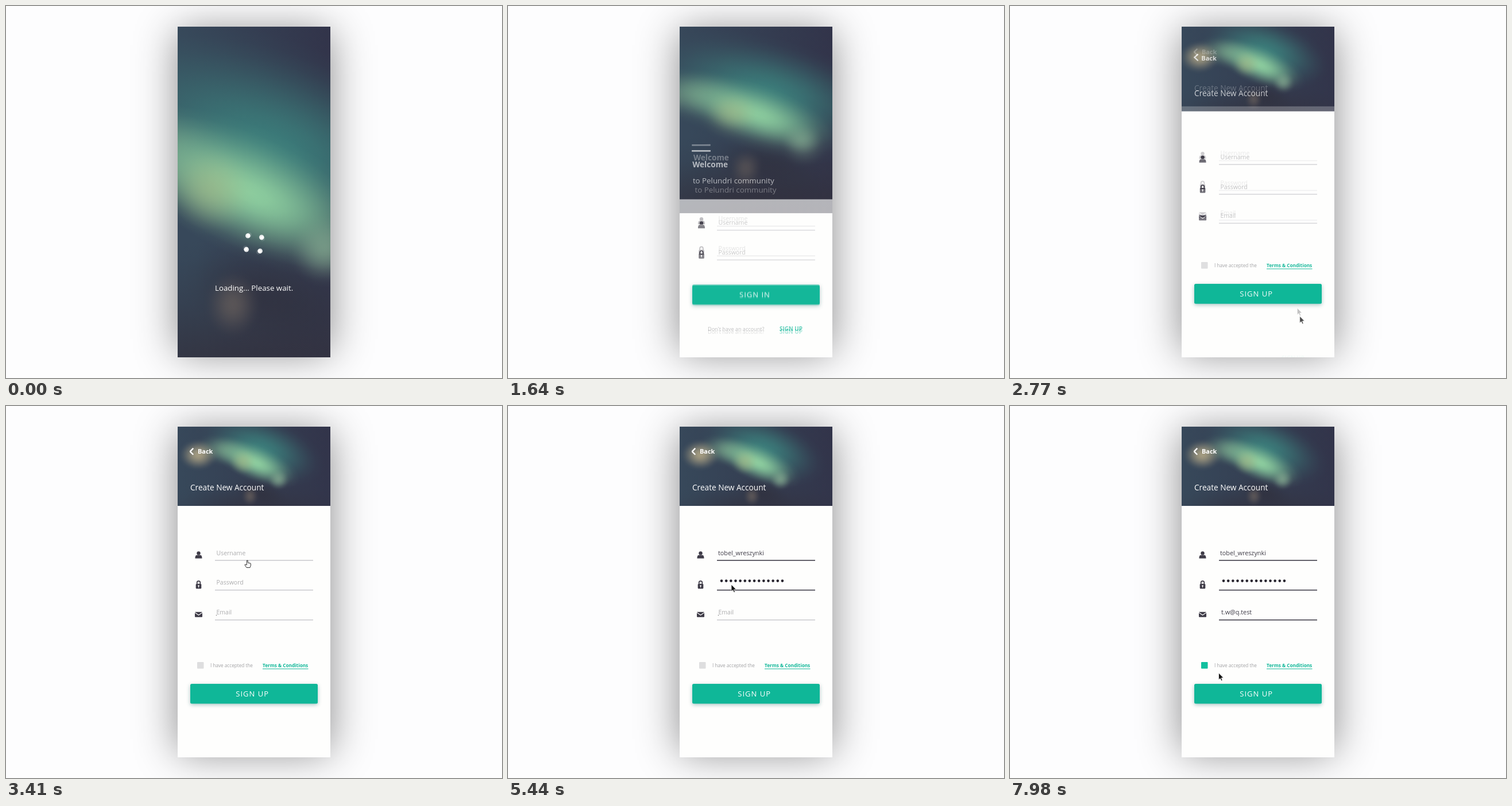
An HTML page with a canvas that plays this animation: 864 px wide and 648 px high, repeating every 8 s.

```html
<!DOCTYPE html>
<html lang="en">
<head>
<meta charset="utf-8">
<title>Sign-up flow</title>
<style>
  html, body { margin: 0; width: 100%; height: 100%; overflow: hidden; background: #fdfdfe; }
  canvas { display: block; }
</style>
</head>
<body>
<canvas id="stage" width="864" height="648"></canvas>
<script>
const W = 864, H = 648, LOOP = 8000;
const STEP = 39.5, PHASE = 1497.2; // neighbouring steps are cross-blended
const PHONE = { x: 299, y: 36, w: 266, h: 576 };
const TEAL = '#0fb798', INK = '#3f3c48', PAPER = '#fefefd', PALE = '#acacae';
const USERNAME = 'tobel_wreszynki', EMAIL = 't.w@q.test', PASSWORD_LENGTH = 14;

const lerp = (a, b, p) => a + (b - a) * p;
const clamp = v => Math.max(0, Math.min(1, v));
const span = (t, start, end) => clamp((t - start) / (end - start));
const easeOut = p => 1 - (1 - p) ** 2.6;
const easeInOut = p => p < .5 ? 2 * p * p : 1 - 2 * (1 - p) ** 2;

function makeLayer() {
  const canvas = document.createElement('canvas');
  canvas.width = W;
  canvas.height = H;
  return canvas;
}

const backdrop = makeLayer();
{
  const b = backdrop.getContext('2d');
  b.fillStyle = '#fdfdfe';
  b.fillRect(0, 0, W, H);
  b.shadowColor = 'rgba(0,0,0,.46)';
  b.shadowBlur = 68;
  b.fillRect(PHONE.x, PHONE.y + 8, PHONE.w, PHONE.h - 16);
}

const layer = makeLayer();
const g = layer.getContext('2d');

function text(str, x, y, size, color, { weight = 400, alpha = 1, spacing = 0 } = {}) {
  if (alpha <= 0) return;
  g.save();
  g.globalAlpha *= alpha;
  g.font = `${weight} ${size}px "Open Sans", "Noto Sans", sans-serif`;
  g.letterSpacing = spacing + 'px';
  g.fillStyle = color;
  g.fillText(str, x, y);
  g.restore();
}

function dot(x, y, r, color) {
  g.fillStyle = color;
  g.beginPath();
  g.arc(x, y, r, 0, 7);
  g.fill();
}

function box(x, y, w, h, r, color) {
  g.fillStyle = color;
  g.beginPath();
  g.roundRect(x, y, w, h, r);
  g.fill();
}

function glow(x, y, rx, ry, turn, rgb, alpha) {
  g.save();
  g.translate(x, y);
  g.rotate(turn);
  g.scale(rx, ry);
  const fill = g.createRadialGradient(0, 0, 0, 0, 0, 1);
  for (let i = 0; i <= 8; i++) {
    const d = i / 8, fade = 1 - d * d * (3 - 2 * d);
    fill.addColorStop(d, `rgba(${rgb},${alpha * fade})`);
  }
  g.fillStyle = fill;
  g.fillRect(-1, -1, 2, 2);
  g.restore();
}

// Soft northern sky, laid out in the coordinates of the full-height screen.
function drawSky(at) {
  const sky = g.createLinearGradient(299, 60, 565, 36);
  sky.addColorStop(0, '#37485a');
  sky.addColorStop(1, '#32344a');
  g.fillStyle = sky;
  g.fillRect(PHONE.x, PHONE.y, PHONE.w, PHONE.h);
  g.save();
  g.translate(at(395, 415, 425), at(520, 275, 157));
  g.scale(at(1, .6, .31), at(1, .47, .3));
  g.translate(-395, -520);
  glow(430, 690, 620, 290, 0, '50,48,61', 1);
  glow(460, 245, 370, 190, .35, '60,130,126', .9);
  glow(250, 255, 170, 95, .2, '128,172,142', .6);
  glow(425, 325, 270, 112, .44, '140,204,158', 1);
  glow(355, 320, 85, 80, .5, '165,185,135', .55);
  glow(455, 505, 170, 95, .3, '48,49,63', .75);
  glow(555, 425, 65, 65, 0, '142,182,152', .6);
  glow(395, 520, 52, 62, 0, '112,102,96', .62);
  glow(105, 280, 115, 95, 0, '190,176,138', .8);
  g.restore();
}

function drawLoader(t) {
  const turn = -398.7 * (1 - span(t, 0, 1450)) * Math.PI / 180;
  for (let i = 0; i < 4; i++) {
    const a = turn + i * Math.PI / 2;
    dot(432 + 17 * Math.cos(a), 413.5 + 17 * Math.sin(a), 4.3, '#fff');
  }
}

// Two bars that lie flat as a rule and open into a back chevron.
function drawBackMark(at) {
  const open = at(.25, 0, 1), y = at(138, 253.5, 79.2);
  const x = at(336.5, 336.5, 323.4), half = at(14, 16.3, 4);
  g.strokeStyle = '#fff';
  g.lineWidth = 2.3;
  for (const side of [-1, 1]) {
    const a = side * open * Math.PI / 4;
    const dx = half * Math.cos(a), dy = half * Math.sin(a);
    const cy = y + side * 2.7 * open;
    g.beginPath();
    g.moveTo(x - dx, cy - dy);
    g.lineTo(x + dx, cy + dy);
    g.stroke();
  }
}

const icons = {
  user(x, y) {
    dot(x, y - 3, 3.2, INK);
    g.beginPath();
    g.moveTo(x - 6, y + 6);
    g.bezierCurveTo(x - 6, y - 1, x - 3, y, x, y + .5);
    g.bezierCurveTo(x + 3, y, x + 6, y - 1, x + 6, y + 6);
    g.fill();
  },
  lock(x, y) {
    box(x - 4.8, y - 1.5, 9.6, 8.5, 1.5, INK);
    g.strokeStyle = INK;
    g.lineWidth = 1.7;
    g.beginPath();
    g.moveTo(x - 2.8, y - 1);
    g.arc(x, y - 3.7, 2.8, Math.PI, 0);
    g.lineTo(x + 2.8, y - 1);
    g.stroke();
    dot(x, y + 2, 1.2, PAPER);
    g.fillRect(x - .5, y + 2, 1, 3);
  },
  mail(x, y) {
    box(x - 6.5, y - 4.5, 13, 9, 1, INK);
    g.strokeStyle = PAPER;
    g.lineWidth = 1.1;
    g.beginPath();
    g.moveTo(x - 6.5, y - 3.5);
    g.lineTo(x, y + 1);
    g.lineTo(x + 6.5, y - 3.5);
    g.stroke();
  }
};

function drawField(icon, label, x, y, alpha, focus, empty) {
  g.save();
  g.globalAlpha *= alpha;
  icons[icon](x, y);
  g.fillStyle = '#c8c8cd';
  g.fillRect(364, y + 8.6, 171, 1.5);
  g.fillStyle = INK;
  g.fillRect(364, y + 8.6, 171 * focus, 1.5);
  if (empty) text(label, 366.5, y, 10.5, PALE);
  g.restore();
}

function drawForm(t, at, shown, joined) {
  const x = at(337, 337, 335.5), y = at(301, 382, 259.5);
  const emailY = at(461, 461, 363.3);
  const typed = [[3650, 4350], [4750, 5350], [6050, 6650]].map(([a, b]) => span(t, a, b));
  const focus = [3550, 4650, 5950].map(a => easeInOut(span(t, a, a + 200)));
  const letters = Math.ceil(typed[0] * USERNAME.length);
  const bullets = Math.ceil(typed[1] * PASSWORD_LENGTH);
  const mailLetters = Math.ceil(typed[2] * EMAIL.length);

  drawField('user', 'Username', x, y, shown, focus[0], !letters);
  drawField('lock', 'Password', x, y + 51.8, shown, focus[1], !bullets);
  drawField('mail', 'Email', x, emailY, joined, focus[2], !mailLetters);
  text(USERNAME.slice(0, letters), 366, y, 10.8, INK);
  for (let i = 0; i < bullets; i++) dot(372 + i * 8.15, 304.6, 2.3, '#25222c');
  text(EMAIL.slice(0, mailLetters), 368, emailY, 10.8, INK);
  if (!mailLetters && joined === 1) dot(366.5, 364.5, .8, '#777');

  g.save();
  g.globalAlpha = shown;
  const buttonY = at(505, 485, 484);
  g.shadowColor = 'rgba(10,90,90,.35)';
  g.shadowBlur = 7;
  g.shadowOffsetY = 2;
  box(321, buttonY, 222, 34.6, 2.5, TEAL);
  g.restore();
  text('SIGN IN', 403, buttonY + 22, 13, '#fff', { alpha: shown * (1 - joined), spacing: 1 });
  text('SIGN UP', 400.3, buttonY + 22, 13, '#fff', { alpha: joined, spacing: 1 });

  const promptY = at(620.5, 565.5, 620.5), prompt = shown * (1 - joined);
  text('Don\'t have an account?', 348, promptY, 9.1, '#9c9c9f', { alpha: prompt });
  text('SIGN UP', 473, promptY, 9.8, TEAL, { weight: 700, alpha: prompt });

  g.save();
  g.globalAlpha = joined;
  box(333, 446, 11.5, 11.5, 1, t > 7250 ? '#12c09f' : '#dededf');
  text('I have accepted the', 356, 455, 8.2, '#a2a2a5');
  text('Terms & Conditions', 447, 455, 8.2, TEAL, { weight: 700 });
  g.fillStyle = TEAL;
  g.fillRect(447, 457.4, 79.5, 1);
  g.restore();
}

const cursorPath = [
  [1800, 620, 606], [2350, 510, 557], [2650, 510, 557], [3300, 419.5, 269],
  [4400, 419.5, 269], [4620, 389, 311], [5500, 389, 311], [5850, 392, 363],
  [6750, 392, 363], [7100, 339, 451], [7350, 339, 451], [7700, 363.5, 465]
];

function shape(points, fill, stroke) {
  g.beginPath();
  points.forEach(([x, y]) => g.lineTo(x, y));
  g.closePath();
  g.lineJoin = 'round';
  g.lineWidth = 1;
  g.fillStyle = fill;
  g.fill();
  g.strokeStyle = stroke;
  g.stroke();
}

function drawCursor(t) {
  if (t < cursorPath[0][0]) return;
  let i = 0;
  while (i < cursorPath.length - 2 && t >= cursorPath[i + 1][0]) i++;
  const [t0, x0, y0] = cursorPath[i], [t1, x1, y1] = cursorPath[i + 1];
  const p = easeInOut(span(t, t0, t1));
  const overControl = (t > 3220 && t < 3650) || (t > 7050 && t < 7400);
  g.save();
  g.translate(lerp(x0, x1, p), lerp(y0, y1, p));
  if (overControl) {
    shape([[0, 0], [1.7, 0], [2, 4.2], [6.5, 5], [7, 8], [5.5, 12.5], [-.5, 12.5],
      [-3.5, 8], [-3, 6.8], [-.2, 8]], '#fff', '#333');
  } else {
    shape([[0, 0], [0, 12], [2.7, 9.5], [4.6, 13.8], [6.5, 13], [4.7, 8.8], [8.4, 8.6]],
      '#111', 'rgba(255,255,255,.75)');
  }
  g.restore();
}

function drawScene(t) {
  const shown = easeOut(span(t, 1517.8, 1683));
  const joined = easeInOut(span(t, 2493, 2817));
  const at = (loading, signIn, signUp) => lerp(lerp(loading, signIn, shown), signUp, joined);
  const edge = at(612, 334, 174);

  g.drawImage(backdrop, 0, 0);
  g.save();
  g.beginPath();
  g.rect(PHONE.x, PHONE.y, PHONE.w, PHONE.h);
  g.clip();
  drawSky(at);
  g.fillStyle = PAPER;
  g.fillRect(PHONE.x, edge, PHONE.w, 613 - edge);

  g.save();
  g.globalAlpha = clamp(1 - shown * 1.6);
  drawLoader(t);
  g.restore();

  g.save();
  g.globalAlpha = shown;
  drawBackMark(at);
  const title = joined > 0 ? 'Back' : 'Welcome';
  const titleSize = at(13.6, 13.6, 10.9);
  text(title, at(341, 321, 334), at(143, 282, 83.2), titleSize, '#fff', { weight: 700 });
  g.restore();

  const headline = joined > 0 ? 'Create New Account'
    : t > 1480 ? 'to Pelundri community' : 'Loading... Please wait.';
  text(headline, at(364, 321.5, 321), at(496, 307, 147.2), joined > 0 ? 13.65 : 13.3, '#fff');
  if (shown > 0) drawForm(t, at, shown, joined);
  g.restore();
  drawCursor(t);
}

const screen = document.getElementById('stage').getContext('2d');
const began = performance.now();

function render() {
  const t = (performance.now() - began) % LOOP;
  const step = Math.floor((t - PHASE) / STEP);
  const earlier = PHASE + step * STEP;
  drawScene(earlier);
  screen.globalAlpha = 1;
  screen.drawImage(layer, 0, 0);
  drawScene(earlier + STEP);
  screen.globalAlpha = (t - earlier) / STEP;
  screen.drawImage(layer, 0, 0);
  requestAnimationFrame(render);
}
render();
</script>
</body>
</html>
```
